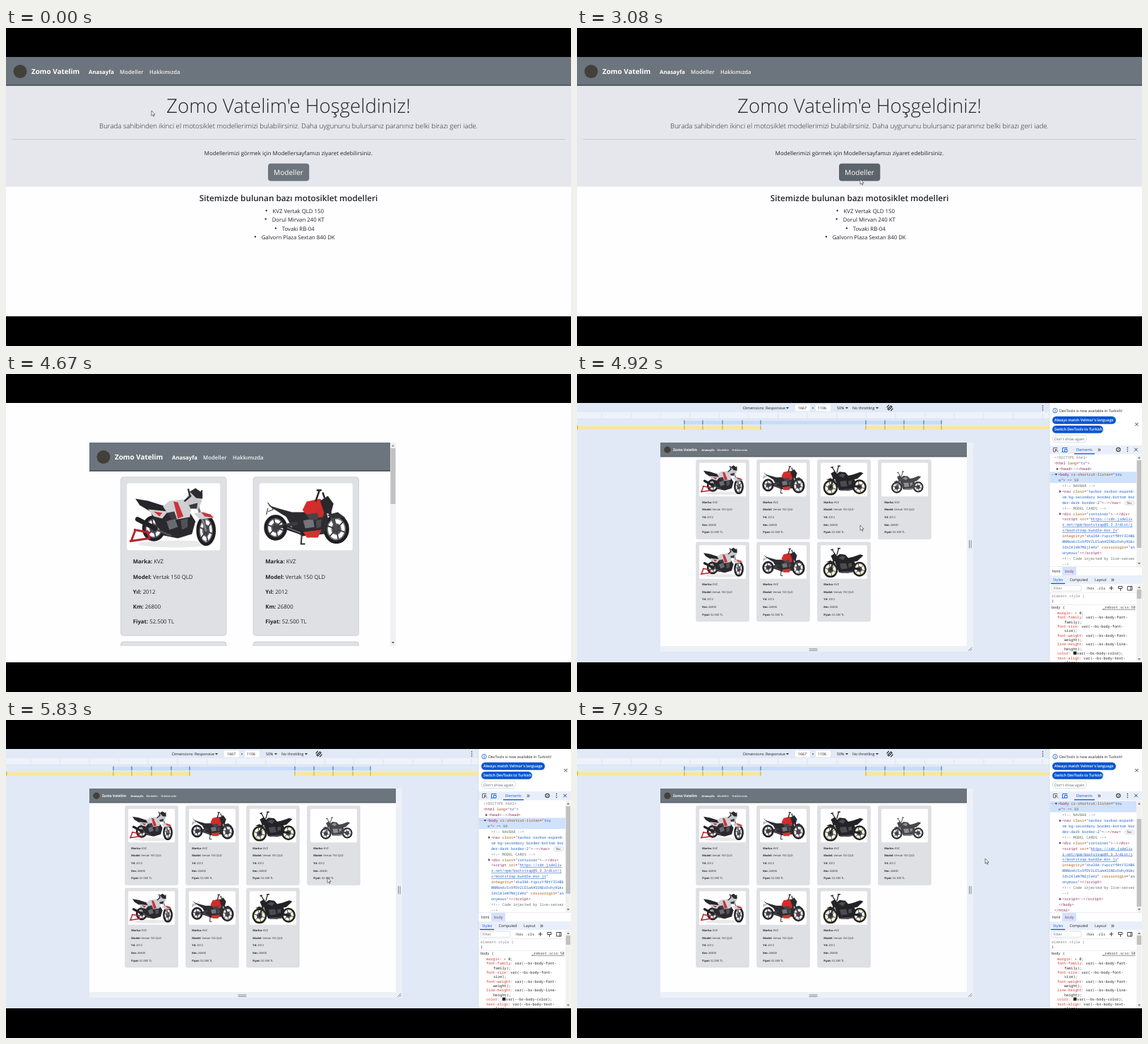
An HTML page that plays this animation: 800x450 px, repeating every 8000 ms.

```html
<!DOCTYPE html>
<html lang="tr">
<head>
<meta charset="utf-8">
<style>
html, body { margin: 0; width: 100%; height: 100%; overflow: hidden; background: #000; }
svg { display: block; }
#stage { width: 100vw; height: 100vh; }
text { font-family: "Open Sans", "Noto Sans", sans-serif; white-space: pre; text-rendering: geometricPrecision; }
.mono { font-family: "Noto Sans Mono", "Liberation Mono", monospace; }
</style>
</head>
<body>
<svg id="stage" viewBox="0 0 800 450"></svg>
<script>
const WHITE = '#fefdff', INK = '#212529', GREY = '#6c757d', BLUE = '#0b57d0';
const BRAND = 'Zomo Vatelim';
const LOOP = 8000, TOP = 41, HEIGHT = 367;

// SVG helpers
const rect = (x, y, w, h, fill, extra = '') =>
  `<rect x="${x}" y="${y}" width="${w}" height="${h}" fill="${fill}" ${extra}/>`;
const poly = (points, fill) => `<polygon points="${points}" fill="${fill}"/>`;
const stroke = (d, color, width = 1) =>
  `<path d="${d}" fill="none" stroke="${color}" stroke-width="${width}" stroke-linecap="round"/>`;
const text = (s, x, y, size, fill = INK, weight = 400, anchor = 'start', extra = '') =>
  `<text x="${x}" y="${y}" font-size="${size}" fill="${fill}" font-weight="${weight}" text-anchor="${anchor}" ${extra}>${s}</text>`;
const mono = (s, x, y, fill = INK, extra = '') =>
  text(s, x, y, 5.2, fill, 500, 'start', 'class="mono" ' + extra);
const group = (transform, content, extra = '') => `<g transform="${transform}" ${extra}>${content}</g>`;

// Motorcycles, drawn in a 132 x 95 box
function wheel(x, y, rx, ry, rim) {
  const ring = (k, color, width, fill = 'none') =>
    `<ellipse cx="${x}" cy="${y}" rx="${rx * k}" ry="${ry * k}" fill="${fill}" stroke="${color}" stroke-width="${width}"/>`;
  let spokes = '';
  for (let a = 0.3; a < 6.2; a += Math.PI / 3)
    spokes += `M${x} ${y}L${x + rx * 0.7 * Math.cos(a)} ${y + ry * 0.7 * Math.sin(a)}`;
  return ring(0.87, '#1f1f23', 5) + ring(0.7, rim, 1.5) + ring(0.36, '#6c6c72', 1.5, '#4a4a50') + stroke(spokes, '#38383d', 1.8);
}

const whiteBike =
  '<ellipse cx="68" cy="86" rx="52" ry="5" fill="#e9e9eb"/>' +
  wheel(38, 64, 16, 18, '#55555a') + wheel(112, 67, 13, 22, '#66666c') +
  stroke('M5 82L32 78M11 66L32 70M12 66L6 82M29 68L32 78', '#b3242f', 3) +
  poly('34,42 88,40 97,54 92,72 72,78 52,74 42,60', '#29292e') +
  poly('56,54 68,50 72,62 60,66', '#696970') + poly('76,52 86,50 86,62 78,66', '#515157') +
  stroke('M62 74L42 66', '#515157', 2.5) + stroke('M40 64L15 51', '#222226', 6.5) +
  poly('12,22 30,25 55,33 60,42 36,42 18,31', '#25252a') +
  poly('30,37 58,40 50,50 38,47', '#d0d0d4') + poly('38,40 50,42 46,47', '#cb343a') +
  poly('51,33 60,25 80,23 92,30 89,48 66,52 57,42', '#cfcfd4') +
  poly('66,26 72,27 80,47 72,50', '#cb343a') + poly('57,42 67,40 71,51 64,52', '#3b3b41') +
  stroke('M100 32L112 67', '#7c7c82', 3.4) +
  poly('82,24 90,11 102,12 106,25 101,37 89,35', '#c7c7cc') +
  poly('89,12 97,7 107,14 107,22 98,21', '#2b2b31') + poly('88,31 100,28 99,36 90,36', '#38383e') +
  poly('95,43 110,40 123,49 103,51', '#d0d0d4') + poly('105,41 118,44 123,49 110,47', '#c9343b') +
  stroke('M82 25L90 18M89 17L87 9M103 19L106 11', '#29292e', 2.4);

const redBike =
  stroke('M12 28L20 37L13 40M12 36L10 44', '#47474c', 1.2) +
  wheel(23, 63, 16, 18, '#55555a') + wheel(109, 65, 18, 21, '#64646a') +
  poly('36,44 94,38 98,52 92,72 60,75 46,62', '#2c2c31') +
  poly('62,53 76,50 78,62 65,64', '#74747a') + poly('80,53 88,51 87,62 81,64', '#4b4b51') +
  stroke('M23 63L52 57', '#3b3b41', 5) + stroke('M62 71L36 62', '#242429', 6) + stroke('M58 70L40 63', '#707076', 1.5) +
  poly('62,69 88,66 83,77 67,77', '#cf3430') +
  poly('12,31 28,36 46,41 66,41 66,51 50,54 32,44', '#2b2b31') +
  poly('61,38 67,26 86,22 95,33 88,44 68,46', '#d42c2a') +
  poly('66,44 88,41 82,52 72,52', '#45454b') + poly('80,36 94,34 90,48 84,49', '#c82e2c') +
  stroke('M96 32L109 65', '#4b4b51', 4) +
  poly('86,25 97,18 105,29 101,44 92,42', '#28282d') +
  poly('96,45 111,41 122,49 104,50', '#303036') +
  stroke('M80 25L85 10M92 20L90 14M82 10L87 10', '#28282d', 2.5) +
  stroke('M60 74L59 86L64 86', '#303036', 2);

const nakedBike = (dark, mid, rim) =>
  wheel(28, 70, 21, 22, rim) + wheel(110, 68, 20, 21, rim) +
  poly('40,44 92,40 100,56 94,74 78,79 52,77 46,62', dark) +
  poly('54,52 72,50 76,66 58,68', mid) + poly('78,52 88,50 88,62 80,66', mid) +
  stroke('M84 64L110 68', dark, 6) + stroke('M58 77L90 75', mid, 4) +
  poly('70,38 92,33 112,26 121,29 104,45 78,50', dark) +
  poly('42,34 54,25 70,27 78,36 77,50 50,52', dark) +
  poly('50,36 60,30 70,33 64,42', mid) +
  stroke('M40 36L28 70', dark, 5) + stroke('M38 42L30 64', mid, 1.6) +
  poly('29,30 40,23 50,35 46,47 35,44', dark) +
  poly('16,48 28,43 46,53 30,50', dark) +
  stroke('M42 28L33 13M46 27L51 9M30 13L35 12M49 9L55 9', dark, 2.6);

const bikes = [
  whiteBike, redBike, nakedBike('#232327', '#4b4b51', '#cfc23a'),
  group('translate(23 18) scale(.74)', nakedBike('#47474d', '#909096', '#606066'))
];

// Website pages, origin at the top left of the viewport
const navbar = width =>
  rect(0, 0, width, 40.5, GREY) + rect(0, 39.6, width, 0.9, INK) +
  '<circle cx="20" cy="20.5" r="9.5" fill="#43403b"/>' +
  text(BRAND, 36, 24.4, 9.9, '#fff', 700) +
  text('Anasayfa', 117, 23.8, 7.8, '#fff', 700) +
  text('Modeller', 161, 23.8, 7.8, '#f1f2f3', 600) +
  text('Hakkımızda', 203, 23.8, 7.7, '#f1f2f3', 600);

const details = [['Marka', 'KVZ'], ['Model', 'Vertak 150 QLD'], ['Yıl', '2012'], ['Km', '26800'], ['Fiyat', '52.500 TL']];

const card = (x, y, kind) => group(`translate(${x} ${y})`,
  rect(0.3, 0.3, 149.4, 224.4, '#dfe0e3', 'rx="4" stroke="#bfc0c4" stroke-width=".6"') +
  rect(9, 9, 132, 95, '#fff', 'rx="3"') +
  group('translate(9 9)', bikes[kind]) +
  details.map(([label, value], i) =>
    text(`<tspan font-weight="700">${label}:</tspan> ${value}`, 17.5, 122.7 + i * 21.3, 7.8)).join(''));

function modelsPage(width, columns) {
  const container = columns === 2 ? 375 : 687.5, pitch = container / columns;
  const left = (width - container) / 2 + (pitch - 150) / 2;
  const kinds = [0, 1, 2, 3, 0, 1, 2];
  return navbar(width) + kinds.map((kind, i) =>
    card(left + (i % columns) * pitch, 48.5 + Math.floor(i / columns) * 233, kind)).join('');
}

const scrollbar = (x, height, thumb) =>
  rect(x, 0, 8, height, '#f1f1f1') + rect(x + 0.5, 8, 7, thumb, '#c1c1c1') +
  poly(`${x + 2},5.5 ${x + 6},5.5 ${x + 4},3`, '#888') +
  poly(`${x + 2},${height - 6} ${x + 6},${height - 6} ${x + 4},${height - 3.5}`, '#555');

const viewport = (x, y, w, h, content) =>
  `<svg x="${x}" y="${y}" width="${w}" height="${h}">${content}</svg>`;

const listed = ['KVZ Vertak QLD 150', 'Dorul Mirvan 240 KT', 'Tovaki RB-04', 'Galvorn Plaza Sextan 840 DK'];
const homePage =
  rect(0, 81, 800, 143.5, '#e6e7ec') + group(`translate(0 ${TOP})`, navbar(800)) +
  text(BRAND + "'e Hoşgeldiniz!", 400, 120, 27.6, INK, 300, 'middle') +
  text('Burada sahibinden ikinci el motosiklet modellerimizi bulabilirsiniz. Daha uygununu bulursanız paranınız belki birazı geri iade.',
    400, 142, 9.7, INK, 300, 'middle') +
  rect(8, 157.3, 784, 0.8, '#c3c4c9') +
  text('Modellerimizi görmek için Modellersayfamızı ziyaret edebilirsiniz.', 400, 180.3, 7.9, INK, 400, 'middle') +
  rect(371, 191.8, 58.3, 24.6, GREY, 'id="button" rx="4"') +
  text('Modeller', 400, 208, 10.1, '#fff', 400, 'middle') +
  text('Sitemizde bulunan bazı motosiklet modelleri', 400, 245.2, 11.75, INK, 600, 'middle') +
  listed.map((name, i) =>
    text(`<tspan font-size="10">•</tspan><tspan dx="7">${name}</tspan>`, 408.3, 261.8 + i * 12.5, 7.8, INK, 400, 'middle')).join('');

const fullModels = viewport(0, TOP, 800, HEIGHT, modelsPage(792, 4) + scrollbar(792, HEIGHT, 248));
const narrowModels = viewport(118, 97, 435, 288, modelsPage(426, 2) + scrollbar(426, 288, 79));

// Developer tools
const small = (s, x, y, fill = '#1f1f1f', weight = 500, size = 5.3) => text(s, x, y, size, fill, weight);
const arrow = (x, y) => poly(`${x},${y} ${x + 4},${y} ${x + 2},${y + 2.6}`, '#333');
const ticks = (xs, y, h, color) => xs.map(x => rect(x - 0.6, y, 1.2, h, color)).join('');

function deviceArea() {
  const breakpoints = [152, 178, 206, 234, 260, 409, 436, 463, 491, 516];
  const ruler = Array.from({ length: 16 }, (_, i) => 35 + i * 41.6);
  return rect(0, TOP, 669, HEIGHT, '#e1e9f6') + rect(0, 54, 669, 9.5, '#edf2fb') +
    ticks(ruler, 55, 8, '#e0e7f2') + rect(0, 63.4, 669, 0.6, '#d5dde9') +
    rect(152, 66.3, 364, 5, '#c7dcfa') + ticks(breakpoints, 65.5, 6, '#3f7fd6') +
    rect(0, 73.7, 260, 4.8, '#fbe699') + rect(409, 73.7, 260, 4.8, '#fbe699') +
    ticks([0.6, ...breakpoints], 72.8, 6, '#d6ac2c') +
    small('Dimensions: Responsive', 235, 50) + arrow(296, 47) +
    rect(309, 43.5, 21, 9, '#fff', 'rx="1"') + small('1667', 313, 50) + small('×', 332.5, 50) +
    rect(338, 43.5, 21, 9, '#fff', 'rx="1"') + small('1106', 341, 50) +
    small('50%', 368, 50) + arrow(380, 47) + small('No throttling', 390, 50) + arrow(423, 47) +
    stroke('M440 49.5L444.5 45L446 46.5L441.5 51ZM439 47L441.5 44.2M447 49L444.5 51.8', '#2b2b2b', 1.2) +
    [45, 48, 51].map(y => `<circle cx="659.5" cy="${y}" r=".8" fill="#333"/>`).join('') +
    rect(118, 97, 443, 296, '#edf0f6') + rect(118, 97, 434, 288, WHITE) +
    viewport(118, 97, 434, 288, group('scale(.5)', modelsPage(868, 4))) +
    stroke('M555.5 235.5V246M558 235.5V246M329 389H340M329 391.3H340M554.5 391.5L559 387M557 391.7L559.3 389.4', '#777b82', 0.9);
}

// "~" plus a letter switches the colour; "‹" stands for "<"
const CODE = { t: '#8a1a52', a: '#9a5200', v: '#1a5fc4', c: '#5c6a61', g: '#777', k: '#222', p: '#d0362c', u: '#1a5fc4' };
const code = (s, x, y) => mono(s.split('~').slice(1).map(part =>
  `<tspan fill="${CODE[part[0]]}"${part[0] === 'u' ? ' text-decoration="underline"' : ''}>${part.slice(1).replace(/‹/g, '&lt;')}</tspan>`).join(''), x, y);

const tree = [
  [676, '~g‹!DOCTYPE html>'],
  [676, '~t‹html ~alang~t="~vtr~t">'],
  [683, '~t‹head>~k⋯~t‹/head>', '▸'],
  [681, '~t‹body ~acz-shortcut-listen~t="~vtru', '▾'],
  [682, '~ve~t">~g == $0'],
  [687, '~c‹!-- NAVBAR -->'],
  [687, '~t‹nav ~aclass~t="~vnavbar navbar-expand-', '▸'],
  [687, '~vsm bg-secondary border-bottom bor'],
  [687, '~vder-dark border-2~t">~k⋯~t‹/nav>'],
  [687, '~c‹!-- MODEL CARDS -->'],
  [687, '~t‹div ~aclass~t="~vcontainer~t">~k⋯~t‹/div>', '▸'],
  [687, '~t‹script ~asrc~t="~uhttps://cdn.jsdeliv'],
  [687, '~ur.net/npm/bootstrap@5.3.3/dist/j'],
  [687, '~us/bootstrap.bundle.min.js~t"'],
  [687, '~aintegrity~t="~vsha384-YvpcrYf0tY3lHB6'],
  [687, '~v0NNkmXc5s9fDVZLESaAA55NDzOxhy9Gkc'],
  [687, '~vIdslK1eN7N6jIeHz~t" ~acrossorigin~t="~van'],
  [687, '~vonymous~t">‹/script>'],
  [687, '~c‹!-- Code injected by live-server'],
  [687, '~c-->'],
  [687, '~t‹script>~k⋯~t‹/script>', '▸'],
  [682, '~t‹/body>'],
  [676, '~t‹/html>']
];
const LINE = 7.93;

const treeRows = rect(669.5, 138.4, 122.5, 15.8, '#d0e1fb') + small('⋯', 671, 144, '#555') +
  tree.map(([x, source, mark], i) => {
    const y = 120.2 + i * LINE;
    const shape = mark === '▾' ? `${x - 4.5},${y - 3} ${x - 0.8},${y - 3} ${x - 2.6},${y - 0.2}`
                               : `${x - 4},${y - 3.5} ${x - 4},${y + 0.2} ${x - 1.2},${y - 1.6}`;
    return code(source, x, y) + (mark ? poly(shape, '#444') : '');
  }).join('') +
  rect(775.5, 179.4, 14, 6, '#f3f5f9', 'rx="3" stroke="#c3c8d0" stroke-width=".5"') + small('flex', 778.5, 184, '#444', 500, 4.2);

const rules = [
  [680, '~pmargin~k: ▸ 0;'],
  ...['font-family', 'font-size', 'font-weight', 'line-height'].flatMap(name => {
    const [head, tail] = name.split('-');
    return [[680, `~p${name}~k: var(~k--bs-body-${head}-`], [690, `~k${tail});`]];
  }),
  [680, '~pcolor~k:   var(--bs-body-color);'],
  [680, '~ptext-align~k: var(--bs-body-text-'],
  [690, '~kalign);']
];

function panel() {
  const pill = (y, w, s) => rect(673, y, w, 10.8, BLUE, 'rx="5.4"') + small(s, 676, y + 7.4, '#fff', 600, 5.3);
  const cross = (x, y) => stroke(`M${x - 2} ${y - 2}l4 4m0 -4l-4 4`, '#333', 0.9);
  const bar = (y, h) => rect(669, y, 131, h, '#e9effa');
  return rect(669, TOP, 131, HEIGHT, '#fff') +
    '<circle cx="677" cy="51.8" r="3.2" fill="none" stroke="#0b57d0" stroke-width=".8"/>' +
    rect(676.6, 51.2, 0.9, 2.6, BLUE) + rect(676.6, 49.6, 0.9, 0.9, BLUE) +
    small('DevTools is now available in Turkish!', 683, 53.8) +
    pill(60, 90, 'Always match Velmor\'s language') + pill(73, 72, 'Switch DevTools to Turkish') +
    rect(673.3, 86.3, 48.4, 10.4, '#fff', 'rx="5.2" stroke="#bcc6d6" stroke-width=".6"') + small("Don't show again", 676, 93.5, '#5f6670') +
    cross(792.5, 71.2) +
    bar(101, 12.6) + stroke('M680 104.5H674.5V110H677M677.5 107L681 110M677.5 107V109.5M677.5 107H680', '#444', 0.8) +
    stroke('M687.5 110V104.5H694M687 110.3H690M691 106.5H694V110.3H691Z', BLUE, 0.9) +
    small('Elements', 707, 109.2, BLUE) + rect(704, 112.2, 29, 1.3, BLUE) + small('»', 737, 110, '#333', 500, 10) +
    '<circle cx="766.5" cy="107" r="2.7" fill="none" stroke="#444" stroke-width="1.2"/><circle cx="766.5" cy="107" r=".8" fill="#444"/>' +
    [104.4, 107, 109.6].map(y => `<circle cx="779.5" cy="${y}" r=".8" fill="#444"/>`).join('') + cross(791.5, 107) +
    viewport(669, 114, 123.5, 158.5, group('translate(-669 -114)', group('translate(0 0)', treeRows, 'id="tree"'))) +
    rect(792.3, 114, 7.2, 158.5, '#f1f1f1') + rect(792.7, 122, 6.4, 124, '#c1c1c1', 'id="thumb"') +
    poly('794,119.5 798,119.5 796,117', '#777') + poly('794,267 798,267 796,269.5', '#777') +
    rect(669, 272.5, 131, 0.5, '#d5dce8') + small('html', 673, 280.5) +
    rect(687, 273, 20, 11.8, '#d3e3fd') + small('body', 691, 280.5, '#a1265a') +
    bar(285, 12.2) + small('Styles', 674, 293, BLUE) + rect(671, 295.8, 20, 1.3, BLUE) +
    small('Computed', 697.5, 293) + small('Layout', 733, 293) + small('»', 756, 293.8, '#333', 500, 10) +
    rect(672, 299, 42, 8.4, '#fff', 'rx="2" stroke="#c6ccd6" stroke-width=".6"') + small('Filter', 674.5, 305.2, '#777') +
    mono(':hov .cls', 720, 304.8) +
    stroke('M754 303H759M756.5 300.5V305.5M767 300.5H772V303.5H767ZM769.5 304V306.5M780 300.5H786V306H780ZM784 300.5V306', '#333', 0.9) +
    rect(669, 309, 123, 0.5, '#d5dce8') + mono('element.style {', 672, 315.8, '#888') + mono('}', 672, 323.4) +
    rect(669, 326, 123, 0.5, '#d5dce8') + mono('body {', 672, 332.3) +
    mono('_reboot.scss:50', 744, 332.3, '#444', 'text-decoration="underline"') +
    rules.map(([x, source], i) => code(source, x, 340 + i * 6.35)).join('') +
    rect(702.8, 392.6, 4.6, 4.6, INK) +
    rect(792.3, 298, 7.2, 110, '#f1f1f1') + rect(792.7, 305, 6.4, 13, '#c1c1c1') +
    poly('794,303 798,303 796,300.5', '#777') + poly('794,402.5 798,402.5 796,405', '#777') +
    rect(668.6, TOP, 0.7, HEIGHT, '#cdd6e5');
}

// Scenes with their start times
const scenes = [
  ['home', 0, homePage], ['models', 3250, fullModels],
  ['narrow', 4580, narrowModels], ['devtools', 4920, deviceArea() + panel()]
];
const stage = document.getElementById('stage');
stage.innerHTML = rect(0, 0, 800, 450, '#000') + rect(0, TOP, 800, HEIGHT, WHITE) +
  scenes.map(([id, , content]) => `<g id="${id}">${content}</g>`).join('') +
  '<path id="pointer" d="M0 0V7.2L1.7 5.7L2.9 8.2L4 7.7L2.9 5.3H5Z" fill="#fff" stroke="#444" stroke-width=".7"/>' +
  '<path id="resizer" d="M-1 -4V4M1 -4V4M-1 0H-4.5M-3 -1.6L-4.7 0L-3 1.6M1 0H4.5M3 -1.6L4.7 0L3 1.6" fill="none" stroke="#666" stroke-width=".8"/>' +
  rect(0, TOP + HEIGHT, 800, 42, '#000');
const el = id => document.getElementById(id);
const show = (id, visible) => el(id).setAttribute('display', visible ? 'inline' : 'none');

// Pointer stops: time, x, y
const stops = [
  [0, 206, 117], [80, 206, 117], [920, 607, 104], [1150, 607, 104], [1900, 480, 190], [2750, 401, 214],
  [5550, 401, 214], [6250, 554, 240], [6600, 554, 240], [7300, 578, 196], [LOOP, 578, 196]
];
function pointerAt(t) {
  const i = stops.findIndex(stop => stop[0] > t);
  const [t0, x0, y0] = stops[i - 1], [t1, x1, y1] = stops[i];
  const p = (t - t0) / (t1 - t0), k = p * p * (3 - 2 * p);
  return [x0 + (x1 - x0) * k, y0 + (y1 - y0) * k];
}

function draw() {
  const t = performance.now() % LOOP;
  const current = scenes.filter(scene => scene[1] <= t).pop()[0];
  for (const [id] of scenes) show(id, id === current);

  const [x, y] = pointerAt(t);
  const onHandle = t > 5000 && x > 551 && x < 561 && y > 230;
  for (const id of ['pointer', 'resizer']) el(id).setAttribute('transform', `translate(${x} ${y})`);
  show('pointer', current !== 'narrow' && !onHandle);
  show('resizer', onHandle);
  const hover = x > 371 && x < 429 && y > 192 && y < 216;
  el('button').setAttribute('fill', hover ? '#5c636a' : GREY);

  const scrolled = t >= 6000;
  el('tree').setAttribute('transform', `translate(0 ${scrolled ? -3 * LINE : 0})`);
  el('thumb').setAttribute('y', scrolled ? 140 : 122);
  requestAnimationFrame(draw);
}
draw();
</script>
</body>
</html>
```
